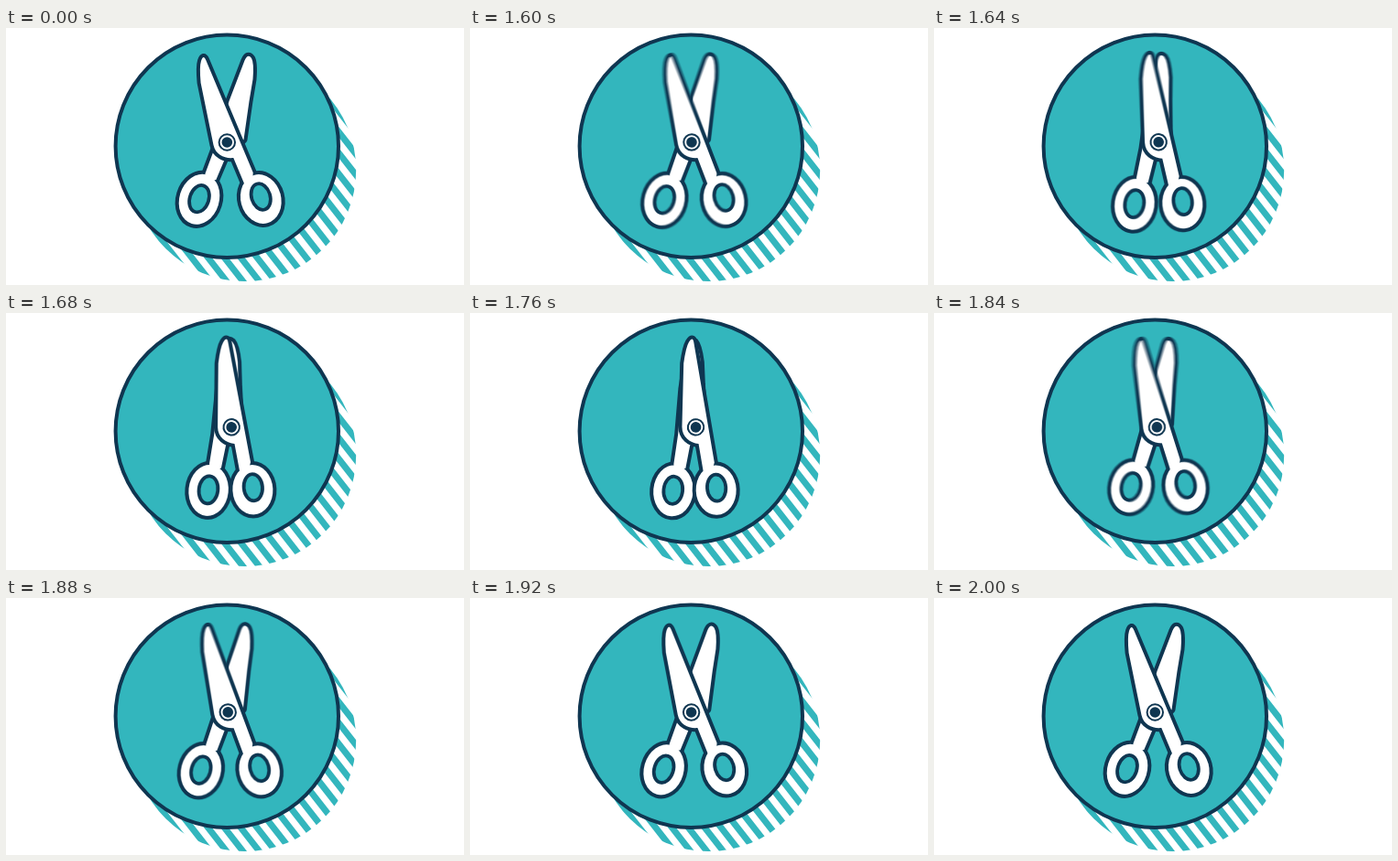
An HTML page with a canvas that plays this animation: 500x281 px, repeating every 6.48 s.

```html
<!DOCTYPE html>
<html lang="en">
<head>
<meta charset="utf-8">
<title>Scissors</title>
<style>
  html, body { margin: 0; width: 100%; height: 100%; overflow: hidden; background: #fff; }
  canvas { display: block; width: 500px; height: 281px; }
</style>
</head>
<body>
<canvas id="stage" width="500" height="281"></canvas>
<script>
const W = 500, H = 281, LOOP = 6480, SNIP = 1600, STEP = 40;
const TEAL = '#33b6bd', NAVY = '#0f3651', WHITE = '#fff';
const RAD = Math.PI / 180;

// One snip: how far the blades are closed, and the motion blur, per step.
const CLOSED = [0.13, 0.74, 0.93, 0.98, 1, 0.8, 0.4, 0.18, 0.06, 0.02, 0];
const BLUR = [0.08, 0.06, 0.02, 0, 0, 0.08, 0.09, 0.05, 0.015, 0, 0];

const ctx = document.getElementById('stage').getContext('2d');

function layer() {
  const c = document.createElement('canvas');
  c.width = W;
  c.height = H;
  return c.getContext('2d');
}

function oval(x, y, rx, ry = rx, tilt = 0) {
  const p = new Path2D();
  p.ellipse(x, y, rx, ry, tilt * RAD, 0, Math.PI * 2);
  return p;
}

function paint(g, path, fill, line, width) {
  if (line) {
    g.strokeStyle = line;
    g.lineWidth = width;
    g.stroke(path);
  }
  if (fill) {
    g.fillStyle = fill;
    g.fill(path);
  }
}

const front = {
  turn: 13, x: 244.5, y: 148,
  body: new Path2D('M213 36Q215.5 28.5 218.2 35L256.7 127L269.7 158L269 172L260 170L248.3 142' +
    'C239 143 229 139 226.5 128L212.6 60Q211 42 213 36Z'),
  ring: oval(278.3, 187, 22, 27.2, -15),
  hole: oval(278.2, 184.5, 8.3, 12.7, -17)
};

const back = {
  turn: -12, x: 250, y: 139,
  body: new Path2D('M260.5 35.5Q264 27.5 268 33Q271 38 269.5 56L265.5 80L259.5 122L239 143' +
    'L229.3 166L217 168L217.5 159L229 128L243.5 80Z'),
  ring: oval(211, 187.3, 21.7, 28, 17),
  hole: oval(211, 186.7, 8.5, 13.2, 18)
};

function drawHalf(g, half, closed) {
  g.save();
  g.translate(half.x, half.y);
  g.rotate(half.turn * closed * RAD);
  g.translate(-half.x, -half.y);
  g.lineJoin = 'round';
  const parts = [half.body, half.ring];
  parts.forEach(p => paint(g, p, null, NAVY, 8));
  parts.forEach(p => paint(g, p, WHITE));
  paint(g, half.hole, TEAL, NAVY, 7.5);
  if (half === front) {
    paint(g, oval(241.3, 125, 8.7), null, NAVY, 2);
    paint(g, oval(241.3, 125, 5.8), NAVY);
  }
  g.restore();
}

function drawBadge(g) {
  g.fillStyle = WHITE;
  g.fillRect(0, 0, W, H);

  // Striped shadow
  g.save();
  g.clip(oval(260.5, 155.3, 121.7));
  g.rotate(52 * RAD);
  g.fillStyle = TEAL;
  const pitch = 14.07, bar = 7;
  for (let y = 5.4; y > -240; y -= pitch) {
    g.fillRect(0, y, 600, bar);
  }
  g.restore();

  const disc = oval(241.3, 129.3, 121.7);
  paint(g, disc, TEAL);
  paint(g, disc, null, NAVY, 4);
}

const badge = layer(), scene = layer();
drawBadge(badge);

function drawScene(closed) {
  scene.drawImage(badge.canvas, 0, 0);
  drawHalf(scene, back, closed);
  drawHalf(scene, front, closed);
}

function render(ms) {
  const step = Math.floor((ms - SNIP) / STEP);
  const closed = CLOSED[step] || 0, blur = BLUR[step] || 0;
  const count = blur ? 9 : 1;
  for (let i = 0; i < count; i++) {
    const offset = count > 1 ? (i / (count - 1) * 2 - 1) * blur : 0;
    drawScene(closed + offset);
    // Running average of all samples
    ctx.globalAlpha = 1 / (i + 1);
    ctx.drawImage(scene.canvas, 0, 0);
  }
  ctx.globalAlpha = 1;
}

const start = performance.now();
function tick() {
  render((performance.now() - start) % LOOP);
  requestAnimationFrame(tick);
}
tick();
</script>
</body>
</html>
```
